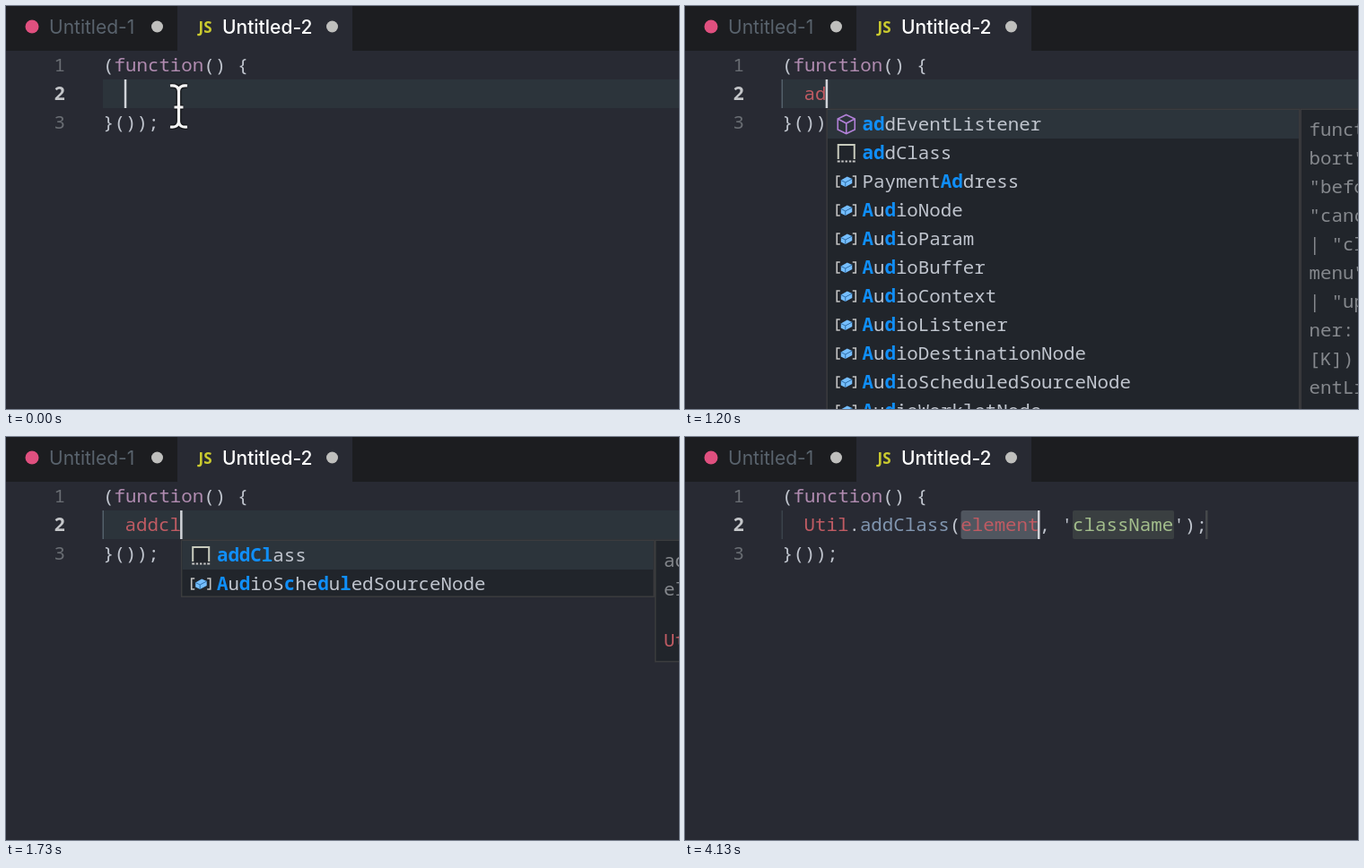
Write an HTML page with a canvas that moves like this. It is 750x450 px and loops after 4.33 s.

```html
<!DOCTYPE html>
<html lang="en">
<head>
<meta charset="utf-8">
<title>Snippet completion</title>
<style>
html, body { margin: 0; width: 100%; height: 100%; overflow: hidden; background: #282a33; }
canvas { display: block; }
</style>
</head>
<body>
<canvas id="stage" width="750" height="450"></canvas>
<script>
const ctx = document.getElementById('stage').getContext('2d');
const LOOP = 4330, ROW = 32, TEXT_X = 132.5, CHAR = 12.48;
const mono = weight => weight + ' 20.8px "Noto Sans Mono", monospace';
const ui = weight => weight + ' 21px Inter, sans-serif';
const C = {
  text: '#c0c5ce', purple: '#b08bb0', red: '#bf5b63', green: '#a3be8c', blue: '#8196b0',
  match: '#108ffa', dim: '#85888d', row: '#2c343b', popup: '#21252b', border: '#3b3c3e', caret: '#d0d3d8'
};

// First letter picks the icon; text between asterisks is a match.
const LISTS = {
  a: ['v*a*rguments', 'm*a*ddEventListener', 'm*a*lert', 'v*a*pplicationCache', 'k*a*sync', 'm*a*tob',
    'k*a*wait', 's*a*ddClass', 'v*A*bortController', 'v*A*bortSignal', 'v*A*bstractRange'],
  ad: ['m*ad*dEventListener', 's*ad*dClass', 'vPayment*Ad*dress', 'v*A*u*d*ioNode', 'v*A*u*d*ioParam',
    'v*A*u*d*ioBuffer', 'v*A*u*d*ioContext', 'v*A*u*d*ioListener', 'v*A*u*d*ioDestinationNode',
    'v*A*u*d*ioScheduledSourceNode', 'v*A*u*d*ioWorkletNode'],
  add: ['m*add*EventListener', 's*add*Class', 'vPayment*Add*ress', 'v*A*u*d*io*D*estinationNode', 'v*A*u*d*ioNo*d*e',
    'v*A*u*d*ioSche*d*uledSourceNode', 'vMediaStream*A*u*d*io*D*estinationNode', 'v*A*u*d*ioWorkletNo*d*e',
    'v*A*u*d*ioBufferSourceNo*d*e', 'vMediaElement*A*u*d*ioSourceNo*d*e', 'vMediaStream*A*u*d*ioSourceNo*d*e'],
  addc: ['s*addC*lass', 'v*A*u*d*ioSche*d*uledSour*c*eNode', 'vRTCIceC*a*n*d*i*d*ate*C*omplete',
    'vRTCIceC*a*n*d*i*d*ateDi*c*tionary', 'vRTCIceC*a*n*d*i*d*atePair*C*hanged', 'vRTCIceC*a*n*d*i*d*ate*C*ollection'],
  addcl: ['s*addCl*ass', 'v*A*u*d*ioS*c*he*d*u*l*edSourceNode']
};
const LISTENER_DOC = ['function', 'bort" |', '"before', '"cancel', '| "clos', 'menu" |', '| "uplo', 'ner: (t', '[K]) =>', 'entList', '"drag"'];
const SNIPPET_DOC = ['addClass', 'element'];
const DOCS = { a: ['(local var)'], ad: LISTENER_DOC, add: LISTENER_DOC, addc: SNIPPET_DOC, addcl: SNIPPET_DOC };

// Start time, typed text, list shown, whether its details are open
const TYPING = [
  [870, 'a', '', false], [930, 'a', 'a', false], [1070, 'a', 'a', true], [1130, 'ad', 'a', true], [1200, 'ad', 'ad', true],
  [1270, 'add', 'add', true], [1470, 'addc', 'add', true], [1530, 'addc', 'addc', true], [1730, 'addcl', 'addcl', true]
];

function rect(x, y, w, h, color, radius = 0) {
  ctx.fillStyle = color;
  ctx.beginPath();
  ctx.roundRect(x, y, w, h, radius);
  ctx.fill();
}

function dot(x, y, r, color) {
  rect(x - r, y - r, 2 * r, 2 * r, color, r);
}

function text(str, x, y, color, font = mono(500)) {
  ctx.font = font;
  ctx.fillStyle = color;
  ctx.fillText(str, x, y);
  return x + ctx.measureText(str).width;
}

function runs(x, y, parts) {
  for (const [str, color, weight = 500] of parts) x = text(str, x, y, color, mono(weight));
}

function stroke(d, color, width = 1.8) {
  ctx.strokeStyle = color;
  ctx.lineWidth = width;
  ctx.stroke(new Path2D(d));
}

function fill(d, color) {
  ctx.fillStyle = color;
  ctx.fill(new Path2D(d));
}

const ICONS = {
  m() {
    stroke('M0-10.5L9.5-6V6L0 10.5-9.5 6V-6ZM-9.5-6L0-1 9.5-6M0-1V10.5', '#b180d7', 1.6);
  },
  v() {
    stroke('M-7-6H-10.5V6H-7M7-6H10.5V6H7', '#c5c5c5', 1.6);
    fill('M-6-1.5L1-5.5 6.5-3V2L-1 6-6 3.5Z', '#75beff');
    stroke('M-6-1.5L-1 1 6.5-3M-1 1V6', '#2f6fa8', 1);
  },
  k() {
    stroke('M3-6H11M-11-1H1M5-1H11M-11 4H-4M0 4H11M-11 9H4M7 9H11', '#c5c5c5');
    stroke('M-10-9H0V-5H-10Z', '#c9a3d8', 1.6);
  },
  s() {
    fill('M-9-9H9V10H-9Z', C.popup);
    stroke('M-9 7V-9H9V7', '#c8cbbd', 2);
    stroke('M-10 9.5H-7M-5.5 9.5H-3M-1.2 9.5H1.2M3 9.5H5.5M7 9.5H10', '#c5c5c5', 2);
  }
};

function drawTabs() {
  rect(0, 0, 750, 50, '#1c1d20');
  rect(191, 0, 195, 50, '#282a33');
  dot(29, 23, 7.5, '#e0507f');
  text('Untitled-1', 48, 31, '#59636d', ui(400));
  dot(168.5, 23, 6.5, '#bfbfbd');
  text('JS', 214.5, 30, '#cbcb2f', '700 17px "Open Sans", sans-serif');
  text('Untitled-2', 241, 31, '#ffffff', ui(500));
  dot(363.5, 23, 6.5, '#bfbfbd');
}

function drawCode() {
  [1, 2, 3].forEach(n => text(n, 53.5, 41 + n * ROW, n === 2 ? '#c4c6c9' : '#696d73', mono(n === 2 ? 700 : 500)));
  runs(108, 73, [['(', C.text], ['function', C.purple], ['() {', C.text]]);
  text('}());', 108, 137, C.text);
}

function drawPointer() {
  const beam = 'M183 89Q192 88 192.5 95Q193 88 202 89M192.5 94V130M183 135Q192 136 192.5 129Q193 136 202 135M187.5 113H197.5';
  stroke(beam, '#15171b', 6);
  stroke(beam, '#f4f4f4', 3.2);
}

function drawCaret(x) {
  rect(x, 82, 2.5, ROW, C.caret);
}

function frame(x, y, w, h) {
  rect(x, y, w, h, C.border);
  rect(x + 1.5, y + 1.5, w - 3, h - 3, C.popup);
}

function drawPopup(key, showDoc) {
  const left = TEXT_X + key.length * CHAR, items = LISTS[key], width = 528;
  const panel = left + width - (key === 'a' ? 1 : 0);
  frame(left, 114.5, width, items.length * ROW + (items.length < 10 ? 0.5 : 20));
  rect(left + 1.5, 116, width - 3, ROW, C.row);
  items.forEach((item, i) => {
    const y = 131 + i * ROW;
    ctx.save();
    ctx.translate(left + 22.3, y + 1);
    ICONS[item[0]]();
    ctx.restore();
    runs(left + 40, y + 7.5, item.slice(1).split('*').map((s, j) => j % 2 ? [s, C.match, 700] : [s, C.text]));
  });
  if (key === 'a') rect(655, 116, 16, 51, '#46474a');
  if (!showDoc) return;

  const doc = DOCS[key], snippet = items[0][0] === 's';
  frame(panel, 114.5, 400, snippet ? 137 : doc.length > 1 ? 400 : 60);
  doc.forEach((line, i) => text(line, panel + 10, 144.5 + i * ROW, C.dim));
  if (snippet) text('Util.addClass', panel + 10, 234, C.red);
}

function drawSnippet(caretOn) {
  rect(107.5, 82, 1.5, ROW, '#3b434b');
  rect(307.5, 82, 86.5, ROW, '#50565f', 3);
  rect(432, 82, 113, ROW, '#3a3f41', 2);
  rect(580, 82, 2.5, ROW, '#45484b');
  runs(TEXT_X, 105, [['Util', C.red], ['.', C.text], ['addClass', C.blue], ['(', C.text], ['element', C.red],
    [", '", C.text], ['className', C.green], ["');", C.text]]);
  if (caretOn) drawCaret(393);
}

function draw(t) {
  rect(0, 0, 750, 450, '#282a33');
  drawTabs();
  if (t < 2130) rect(108, 82, 642, ROW, C.row);
  drawCode();
  if (t < 870) {
    if (t < 200 || t >= 670) drawCaret(131.8);
    drawPointer();
  } else if (t < 2130) {
    const [, typed, list, showDoc] = TYPING.findLast(step => t >= step[0]);
    rect(107.5, 82, 1.5, ROW, '#53606b');
    const end = text(typed, TEXT_X, 105, C.red);
    if (list) drawPopup(list, showDoc);
    drawCaret(end - 0.8);
  } else {
    drawSnippet(t < 2600 || (t >= 3130 && t < 3600) || t >= 4130);
  }
}

const start = performance.now();
function tick() {
  draw((performance.now() - start) % LOOP);
  requestAnimationFrame(tick);
}
tick();
</script>
</body>
</html>
```
